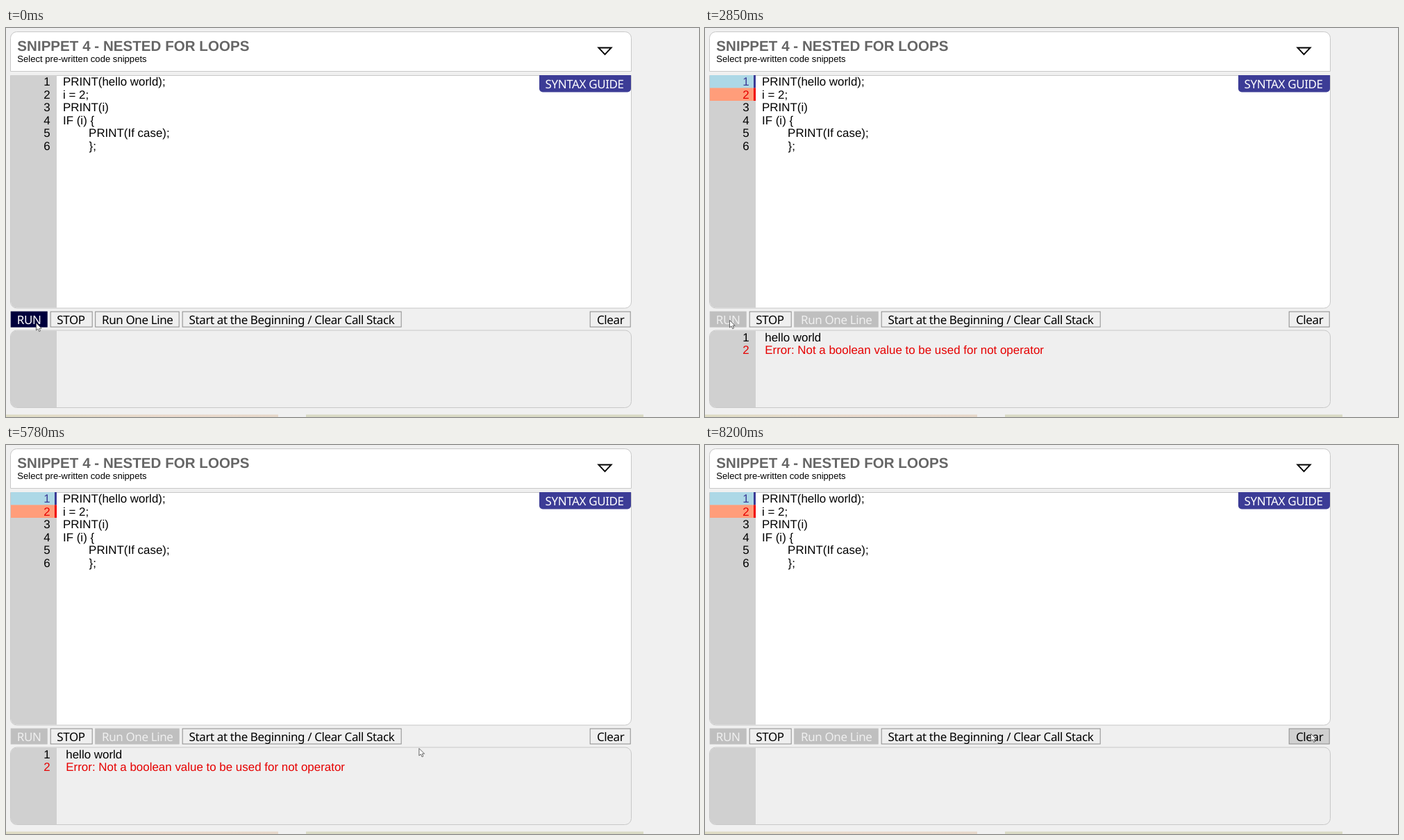
An HTML page for the animation above (8280 ms loop, 998 by 561 pixels).

```html
<!DOCTYPE html>
<html lang="en">
<head>
<meta charset="utf-8">
<title>Snippet runner</title>
<style>
  html, body { margin: 0; width: 100%; height: 100%; overflow: hidden; background: #f0f0f0; }
  svg { display: block; width: 998px; height: 561px; }
  text { white-space: pre; text-rendering: geometricPrecision; }
  .code { font: 16.93px "Liberation Sans", Arial, sans-serif; }
  .num { text-anchor: middle; }
  .title { font: bold 20.6px "Liberation Sans", Arial, sans-serif; fill: #666; }
  .sub { font: 13.1px "Liberation Sans", Arial, sans-serif; }
  .ui { font: 17px "Noto Sans", "Open Sans", sans-serif; letter-spacing: -.39px; }
  .panel { stroke: #c8c8c8; }
</style>
</head>
<body>
<svg id="stage" viewBox="0 0 998 561">
  <defs>
    <linearGradient id="strip">
      <stop offset="0" stop-color="#dedcc4"/>
      <stop offset=".6" stop-color="#ead9cc"/>
      <stop offset="1" stop-color="#e6d8ca"/>
    </linearGradient>
  </defs>
  <rect width="998" height="561" fill="#f0f0f0"/>
  <rect y="557.5" width="392" height="4" fill="url(#strip)"/>
  <rect x="432" y="557.5" width="486" height="4" fill="#d9dac4"/>

  <path class="panel" fill="#fff" d="M6.5 62.5V14.5a9 9 0 0 1 9-9H891.5a9 9 0 0 1 9 9V62.5Z"/>
  <text class="title" x="16.3" y="32.9">SNIPPET 4 - NESTED FOR LOOPS</text>
  <text class="sub" x="16.3" y="49.4">Select pre-written code snippets</text>
  <path d="M853.5 28.6H871.5L862.5 38.1Z" fill="#fff" stroke="#000" stroke-width="2"/>

  <path class="panel" fill="#fff" d="M6.5 68.5H900.5V395a9 9 0 0 1-9 9H15.5a9 9 0 0 1-9-9Z"/>
  <path fill="#d0d0d0" d="M7 68H73V403.5H15.5a8.5 8.5 0 0 1-8.5-8.5Z"/>
  <path fill="#3c3c96" d="M768 68H900V87.5a5 5 0 0 1-5 5H773a5 5 0 0 1-5-5Z"/>
  <text class="ui" x="776.5" y="86.7" fill="#fff">SYNTAX GUIDE</text>

  <rect class="panel" x="6.5" y="436" width="894" height="111.5" rx="9" fill="#efefef"/>
  <path fill="#d0d0d0" d="M73 436.5V547H15.5a8.5 8.5 0 0 1-8.5-8.5V445a8.5 8.5 0 0 1 8.5-8.5Z"/>

  <g id="marks"></g>
  <g id="lines"></g>
  <g id="buttons"></g>
  <g id="output"></g>
  <path id="cursor" d="M.5 .5V11L3 8.800L4.700 12.700L6.500 11.900L4.900 8.200H8.200Z"
        fill="#fff" stroke="#555" stroke-width=".9" stroke-linejoin="round"/>
</svg>
<script>
const LOOP = 8280, ROW = 18.55;
const INDIGO = '#3c3c96', RED = '#e60000';
const $ = id => document.getElementById(id);

function add(parent, tag, attrs, text) {
  const el = document.createElementNS('http://www.w3.org/2000/svg', tag);
  for (const key in attrs) el.setAttribute(key, attrs[key]);
  if (text) el.textContent = text;
  parent.appendChild(el);
  return el;
}

const number = (parent, n, y, fill = '#000') =>
  add(parent, 'text', { class: 'code num', x: 59, y, fill }, String(n));

// Program listing: text and left edge
const program = [
  ['PRINT(hello world);', 82], ['i = 2;', 82], ['PRINT(i)', 82],
  ['IF (i) {', 82], ['PRINT(If case);', 119.1], ['};', 119.6]
];
const numbers = program.map(([text, x], i) => {
  const y = 83.1 + i * ROW;
  add($('lines'), 'text', { class: 'code', x, y }, text);
  return number($('lines'), i + 1, y);
});

const marks = [0, 1].map(i => {
  const y = 68 + i * 18.5;
  return {
    back: add($('marks'), 'rect', { x: 7, y, width: 63, height: 18.5 }),
    bar: add($('marks'), 'rect', { x: 70, y, width: 3, height: 18.5 })
  };
});

const output = [
  ['hello world', '#000', 840],
  ['Error: Not a boolean value to be used for not operator', RED, 2160]
].map(([text, fill, from], i) => {
  const g = add($('output'), 'g', {}), y = 451.5 + i * 18.9;
  number(g, i + 1, y, fill);
  add(g, 'text', { class: 'code', x: 86.3, y, fill }, text);
  return { g, from };
});

// Buttons: label, box left, width, text left
const buttons = [
  ['RUN', 7, 53, 15.8], ['STOP', 64, 61, 73.3], ['Run One Line', 128.5, 121.5, 138],
  ['Start at the Beginning / Clear Call Stack', 254, 316, 263.6], ['Clear', 841, 59, 851]
].map(([label, x, width, left]) => ({
  box: add($('buttons'), 'rect', { x: x + .2, y: 409.1, width: width - 1, height: 22 }),
  text: add($('buttons'), 'text', { class: 'ui', x: left, y: 426.7 }, label)
}));

const clamp = v => Math.min(1, Math.max(0, v));
const ease = v => v * v * (3 - 2 * v);
const fade = (t, from, length) => ease(clamp((t - from) / length));
const mix = (a, b, k) => `rgb(${a.map((v, i) => Math.round(v + (b[i] - v) * k))})`;

const NAVY = [0, 0, 60], PALE = [239, 239, 239], GREY = [191, 191, 191],
      HOVER = [208, 208, 208], EDGE = [140, 140, 140], BLACK = [0, 0, 0], WHITE = [255, 255, 255];

function paint(i, box, edge, text) {
  buttons[i].box.setAttribute('fill', box);
  buttons[i].box.setAttribute('stroke', edge);
  buttons[i].text.setAttribute('fill', text);
}

function mark(i, state) {
  const { back, bar } = marks[i];
  const [fill, side, ink] = {
    off: ['none', 'none', '#000'],
    run: ['#add8e6', INDIGO, INDIGO],
    error: ['#ff9d7a', '#f00000', RED]
  }[state];
  back.setAttribute('fill', fill);
  bar.setAttribute('fill', side);
  numbers[i].setAttribute('fill', ink);
}

// Pointer path: time, x, y
const path = [
  [0, 43, 425], [2530, 43, 425], [2850, 35, 421], [4820, 35, 421], [5180, 244, 413],
  [5780, 594, 437], [6100, 722, 446], [6460, 829, 437], [6820, 872, 416], [LOOP, 872, 416]
];
function pointer(t) {
  const i = Math.max(1, path.findIndex(p => p[0] > t));
  const [a, b] = [path[i - 1], path[i]];
  const k = (t - a[0]) / (b[0] - a[0]);
  return [a[1] + (b[1] - a[1]) * k, a[2] + (b[2] - a[2]) * k];
}

// Buttons that react to the pointer: index, enter time, leave time
const hovers = [[1, 4870, 4975], [3, 5197, 5570], [4, 6500, LOOP]];

function render(t) {
  const off = fade(t, 260, 380);
  const run = mix(NAVY, GREY, off);
  const step = mix(PALE, GREY, off);
  paint(0, run, run, mix(WHITE, PALE, off));
  paint(2, step, mix(EDGE, GREY, off), mix(BLACK, PALE, off));

  for (const [i, enter, leave] of hovers) {
    const k = fade(t, enter, 280) * (1 - fade(t, leave, 200));
    paint(i, mix(PALE, HOVER, k), `rgb(${EDGE})`, '#000');
  }

  mark(0, t < 280 ? 'off' : 'run');
  mark(1, t < 1330 ? 'off' : t < 2160 ? 'run' : 'error');
  for (const { g, from } of output)
    g.setAttribute('visibility', t >= from && t < 8160 ? 'visible' : 'hidden');

  $('cursor').setAttribute('transform', `translate(${pointer(t)})`);
}

const start = performance.now();
function tick() {
  render((performance.now() - start) % LOOP);
  requestAnimationFrame(tick);
}
tick();
</script>
</body>
</html>
```
